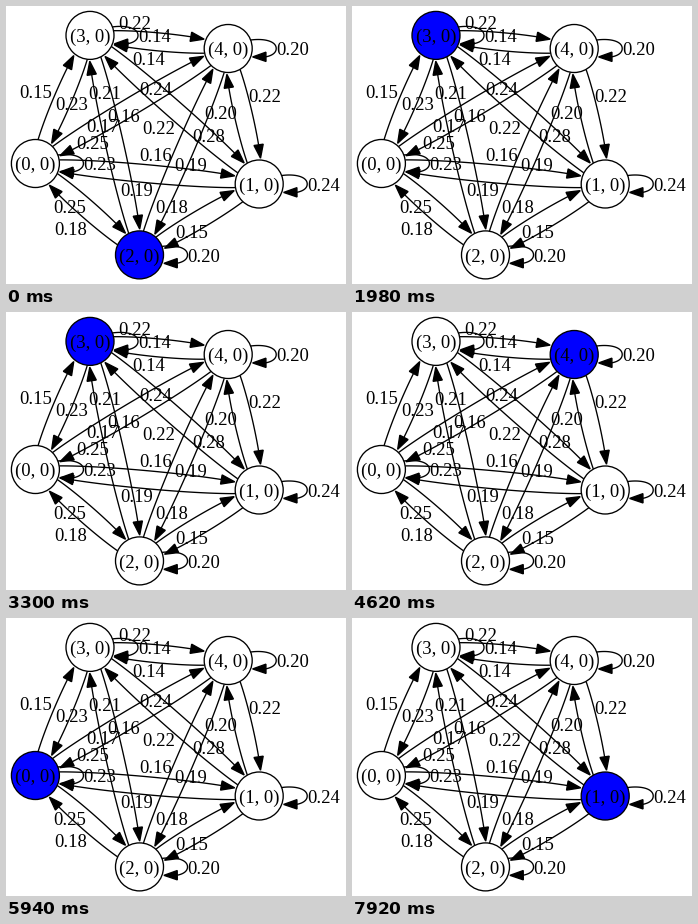
A matplotlib script for the animation above (8000 ms loop, 340 by 278 pixels).

```python
import numpy as np
import matplotlib.pyplot as plt
from matplotlib.animation import FuncAnimation
from matplotlib.collections import LineCollection, PolyCollection
from matplotlib.patches import Circle

W, H, DPI = 340, 278, 96
PT = DPI / 72                     # pixels per point
RADIUS = 18 * PT
BEND = 9 * PT                     # sideways pull on the edge curves
HEAD_LEN, HEAD_HALF = 10 * PT, 3.5 * PT
TIP_GAP = PT / 2 * np.hypot(HEAD_LEN, HEAD_HALF) / HEAD_HALF  # miter overhang
BASELINE = 5.05 * PT              # from a node's centre to its text baseline

STEP, LOOP, INTERVAL = 330, 8000, 20
# active node in every step of the random walk
WALK = [2, 0, 3, 3, 0, 0, 3, 2, 3, 2, 3, 0, 1, 0, 4, 2, 3, 4, 0, 0, 0, 3, 1, 2, 1]

NODES = [np.array(p) for p in
         [(29.4, 157.5), (253.2, 178), (133.5, 248.9), (84, 29.4), (222.2, 42.5)]]
LOOP_LABELS = ["0.23", "0.24", "0.20", "0.14", "0.20"]
# text, centre x, baseline y
EDGE_LABELS = [
    ("0.22", 129, 23), ("0.14", 143, 59), ("0.15", 30, 92), ("0.23", 66, 104),
    ("0.21", 99, 93), ("0.24", 150, 89), ("0.22", 259, 96), ("0.17", 96.5, 125.5),
    ("0.16", 118, 116), ("0.25", 87, 143), ("0.22", 153, 128), ("0.20", 215, 113),
    ("0.28", 203, 136), ("0.16", 150, 155), ("0.19", 185, 165), ("0.19", 131, 190),
    ("0.18", 166, 207), ("0.25", 64, 207), ("0.18", 65, 229), ("0.15", 186, 232),
]


def bezier(a, b, c, d, n=600):
    t = np.linspace(0, 1, n)[:, None]
    s = 1 - t
    return s**3 * a + 3 * s * s * t * b + 3 * s * t * t * c + t**3 * d


def dist(pts, p):
    return np.hypot(*(pts - p).T)


def edge_curve(a, b):
    dx, dy = b - a
    side = np.array([dy, -dx]) / np.hypot(dx, dy) * BEND
    return bezier(a, a + side, b + side, b)


def loop_curve(c):
    reach = RADIUS + 18 * PT
    top = bezier(c, c + (reach / 3, -BEND), c + (reach, -BEND), c + (reach, 0))
    bottom = top[::-1] * (1, -1) + (0, 2 * c[1])
    return np.vstack([top, bottom[1:]])


def with_arrow(pts, tail, head):
    """Clip a curve at both nodes and split it into a line and an arrowhead."""
    half = len(pts) // 2
    start = np.argmax(dist(pts, tail) >= RADIUS)
    end = half + np.argmax(dist(pts[half:], head) <= RADIUS)
    rim = pts[end]
    far = dist(pts[start:end], rim) >= HEAD_LEN + TIP_GAP
    stop = start + np.nonzero(far)[0][-1]
    base = pts[stop]
    ux, uy = (rim - base) / np.hypot(*(rim - base))
    tip = rim - np.array([ux, uy]) * TIP_GAP
    wing = np.array([-uy, ux]) * HEAD_HALF
    return pts[start:stop + 1], np.array([base + wing, tip, base - wing])


def label(text, x, y):
    ax.text(x, y, text, ha="center", va="baseline", fontsize=14,
            family="Liberation Serif", color="black", zorder=4)


fig = plt.figure(figsize=(W / DPI, H / DPI), dpi=DPI, facecolor="white")
ax = fig.add_axes([0, 0, 1, 1])
ax.set_xlim(0, W)
ax.set_ylim(H, 0)
ax.axis("off")

discs = [Circle(c, RADIUS, fc="white", ec="black", lw=1, zorder=1) for c in NODES]
for i, (disc, (x, y)) in enumerate(zip(discs, NODES)):
    ax.add_patch(disc)
    label(f"({i}, 0)", x, y + BASELINE)
    label(LOOP_LABELS[i], x + RADIUS + 18 * PT + 16.3, y + BASELINE)
for item in EDGE_LABELS:
    label(*item)

parts = [with_arrow(loop_curve(a) if a is b else edge_curve(a, b), a, b)
         for a in NODES for b in NODES]
lines, heads = zip(*parts)
ax.add_collection(LineCollection(lines, colors="black", linewidths=1, zorder=2),
                  autolim=False)
ax.add_collection(PolyCollection(heads, facecolors="black", edgecolors="black",
                                 linewidths=1, joinstyle="miter", zorder=3),
                  autolim=False)


def update(frame):
    step = int((frame * INTERVAL + INTERVAL / 2) // STEP)
    active = WALK[min(step, len(WALK) - 1)]
    for i, disc in enumerate(discs):
        disc.set_facecolor("#0000ff" if i == active else "white")
    return discs


anim = FuncAnimation(fig, update, frames=LOOP // INTERVAL, interval=INTERVAL,
                     init_func=lambda: update(0), repeat=True, repeat_delay=0)
plt.show()
```
